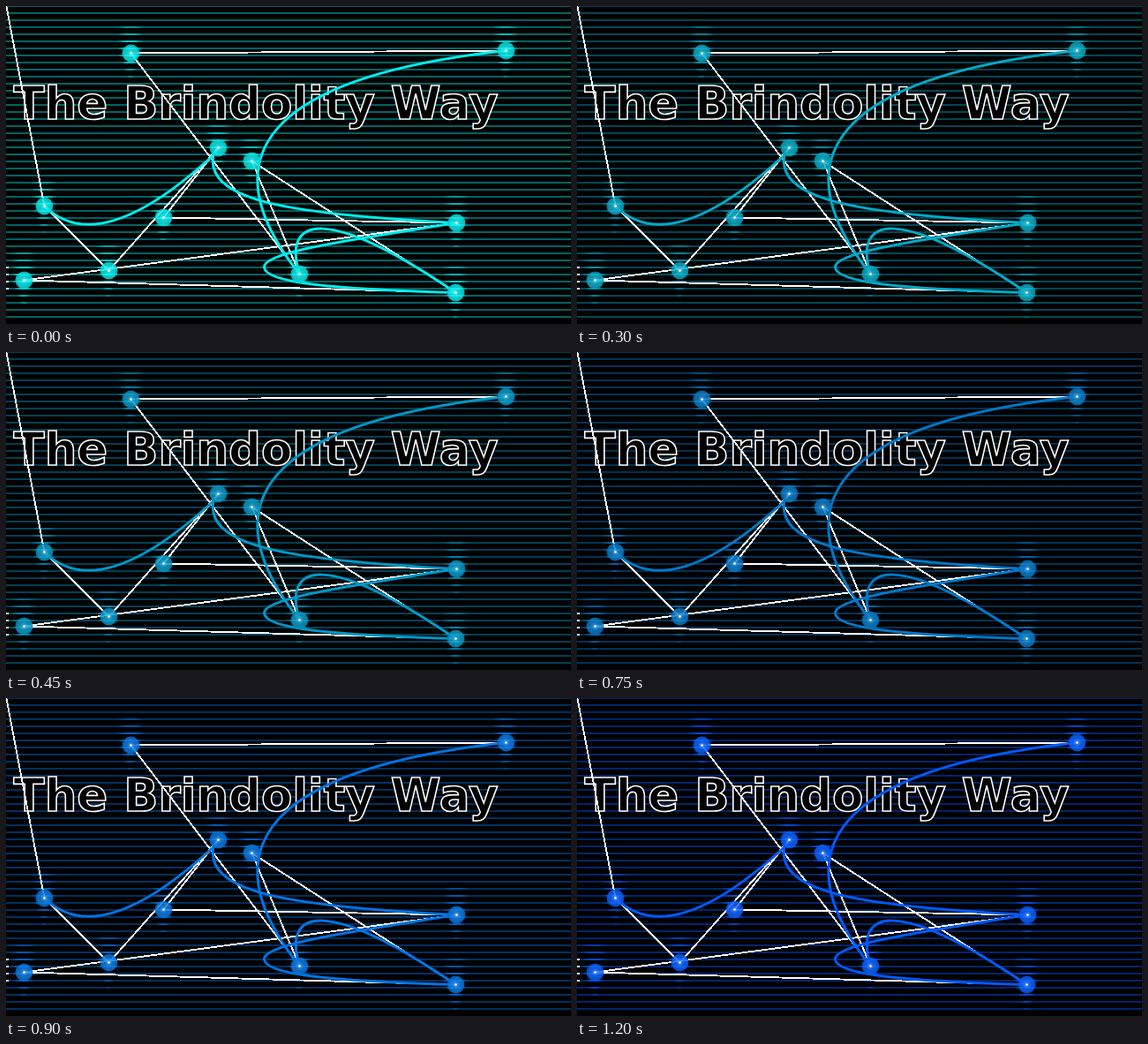
Animation, 640 px wide and 360 px high, one loop 1350 ms. Source, as an HTML page:

```html
<!DOCTYPE html>
<html lang="en">
<head>
<meta charset="utf-8">
<title>Node map</title>
<style>
  html, body { margin: 0; width: 100%; height: 100%; overflow: hidden; background: #000; }
  svg { display: block; width: 100vw; height: 100vh; }
  .title { font: bold 51.5px "DejaVu Sans", sans-serif; fill: #000; stroke: #fff; stroke-width: 1.6; }
  .links { fill: none; stroke: #fff; stroke-width: 1.9; }
  .curves { fill: none; stroke: var(--accent); stroke-width: 3; }
  .accent { fill: var(--accent); }
  stop.hue { stop-color: var(--accent); }
</style>
</head>
<body>
<svg id="stage" viewBox="0 0 640 360">
  <defs>
    <linearGradient id="flare">
      <stop class="hue" offset="0" stop-opacity="0"/>
      <stop class="hue" offset=".35"/>
      <stop class="hue" offset=".65"/>
      <stop class="hue" offset="1" stop-opacity="0"/>
    </linearGradient>
    <radialGradient id="shine">
      <stop offset="0" stop-color="#fff" stop-opacity=".3"/>
      <stop offset=".5" stop-color="#fff" stop-opacity=".04"/>
      <stop offset="1" stop-color="#000" stop-opacity=".15"/>
    </radialGradient>
  </defs>
  <rect width="640" height="360"/>
  <g id="stripes" class="accent" opacity=".42" shape-rendering="crispEdges"></g>
  <g id="flares"></g>
  <text class="title" x="8.5" y="128">The Brindolity Way</text>
  <g id="links" class="links" shape-rendering="crispEdges" transform="translate(.5 .5)"></g>
  <g class="curves" transform="translate(.5 .5)">
    <path d="M43 226Q106 288 238 165"/>
    <path d="M235 165C222 218 310 235 510 245"/>
    <path d="M566 50C290 80 228 172 332 303"/>
    <path d="M510 245C400 263 292 277 292 295S370 320 509 324"/>
    <path d="M332 303C312 238 362 224 509 324"/>
  </g>
  <g id="nodes" transform="translate(.5 .5)"></g>
</svg>
<script>
  const STEP = 150, STRIPE = 8, REACH = 30;
  const palette = [
    [0, 236, 236], [0, 200, 216], [0, 170, 200],
    [0, 152, 200], [0, 136, 200], [0, 120, 200],
    [0, 116, 228], [0, 110, 255], [0, 90, 255]
  ];
  const nodes = {
    a: [141, 53], b: [566, 50], c: [240, 160], d: [278, 175], e: [43, 226], f: [178, 239],
    g: [510, 245], h: [116, 299], i: [332, 303], j: [20, 310], k: [509, 324], origin: [0, 0]
  };
  const links = [
    "origin e", "e h", "h c", "f c", "f g", "j g", "j k", "a b", "a i", "d i", "d k"
  ];

  const stage = document.getElementById("stage");

  function add(parent, tag, attrs) {
    const el = document.createElementNS("http://www.w3.org/2000/svg", tag);
    for (const key in attrs) el.setAttribute(key, attrs[key]);
    document.getElementById(parent).append(el);
  }

  // stripes are two pixels high, ending on each multiple of eight
  for (let y = -1; y < 352; y += STRIPE) {
    add("stripes", "rect", { y, width: 640, height: 2 });
  }

  for (const link of links) {
    const [from, to] = link.split(" ").map(name => nodes[name]);
    add("links", "path", { d: `M${from}L${to}` });
  }
  // short ticks at the left edge
  for (let y = 296; y <= 320; y += STRIPE) {
    add("links", "path", { d: `M-1 ${y - 0.5}h3` });
  }

  // the glow is wide above a node and tapers below it
  function addFlares(x, y) {
    for (let row = Math.ceil((y - REACH) / STRIPE) * STRIPE; row <= y + REACH; row += STRIPE) {
      const below = Math.max(0, row - y), above = Math.max(0, y - row);
      const half = 15 - below * 0.4;
      add("flares", "rect", {
        x: x - half, y: row - 1, width: 2 * half, height: 2,
        fill: "url(#flare)", opacity: 1 - above / 50 - below / 40
      });
    }
  }

  for (const [name, [x, y]] of Object.entries(nodes)) {
    if (name === "origin") continue;
    addFlares(x, y);
    const spot = { cx: x, cy: y };
    add("nodes", "circle", { ...spot, r: 10, class: "accent", opacity: 0.85 });
    add("nodes", "circle", { ...spot, r: 10, fill: "url(#shine)" });
    add("nodes", "circle", { ...spot, r: 1.3, fill: "#fff" });
  }

  function render(time) {
    const index = Math.floor(time / STEP) % palette.length;
    stage.style.setProperty("--accent", `rgb(${palette[index]})`);
  }

  let start;
  function tick(now) {
    start ??= now;
    render(now - start);
    requestAnimationFrame(tick);
  }
  render(0);
  requestAnimationFrame(tick);
</script>
</body>
</html>
```
